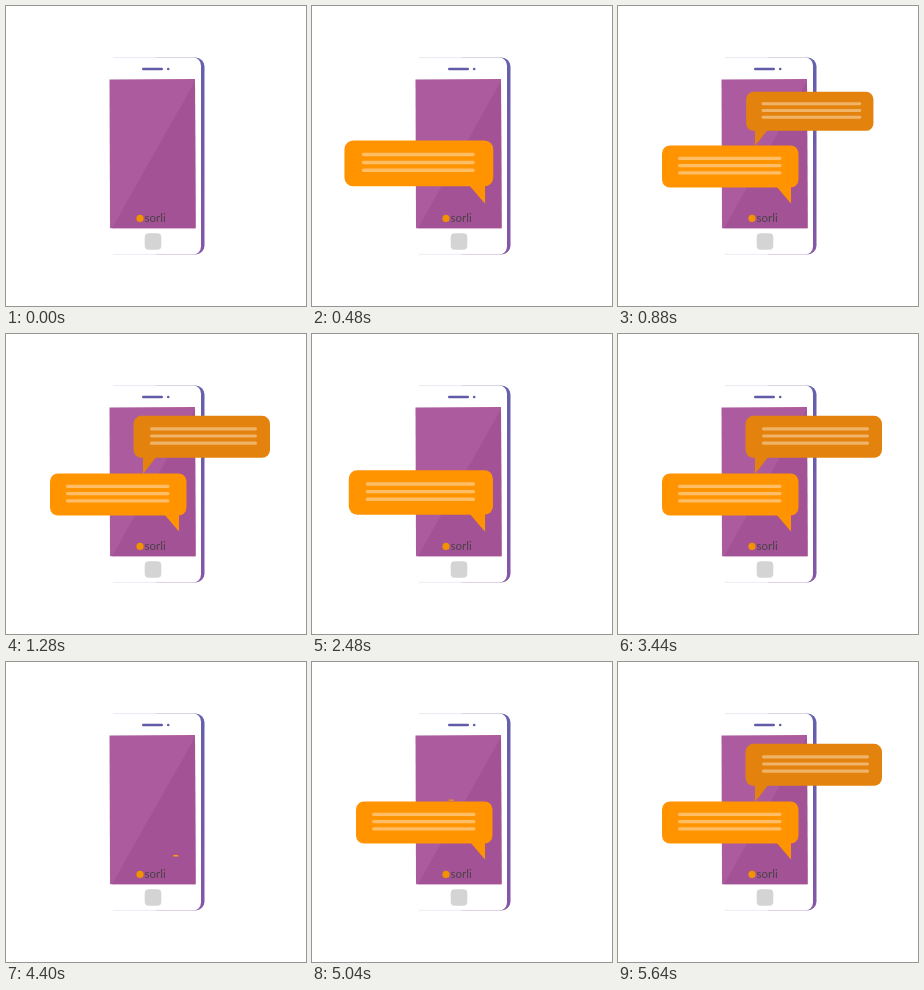
Recreate the animation shown at these times as an HTML page with a canvas. Size 300x300 px, loop 6 s.

```html
<!DOCTYPE html>
<html lang="en">
<head>
<meta charset="utf-8">
<title>Phone chat</title>
<style>
  html, body { margin: 0; width: 100%; height: 100%; overflow: hidden; background: #fff; }
  canvas { display: block; width: 300px; height: 300px; }
</style>
</head>
<body>
<canvas id="stage"></canvas>
<script>
const LOOP = 6000;
const TICK = 40;
const STEPS = 16;
const PEAK_STEP = 10.5;
const PEAK_SCALE = 1.1;
const REPLY_DELAY = 640;
const STARTS = [40, 2200, 4400];

const canvas = document.getElementById('stage');
const ctx = canvas.getContext('2d');
const dpr = window.devicePixelRatio || 1;
canvas.width = canvas.height = 300 * dpr;

const ASK = {
  x: 44, y: 139.5, w: 136.5, h: 42, fill: '#ff9300', line: '#ffbe66',
  tail: [[158, 180], [173, 197.5], [173, 180]],
  lines: [60, 163.5, 152.4], origin: [172, 195]
};
const REPLY = {
  x: 127.5, y: 81.8, w: 136.5, h: 42, fill: '#e3820d', line: '#f0b468',
  tail: [[137, 122], [137, 140], [151, 122]],
  lines: [144, 251, 94.8], origin: [137, 139.5]
};

function roundRect(x, y, w, h, r, fill) {
  ctx.beginPath();
  ctx.roundRect(x, y, w, h, r);
  ctx.fillStyle = fill;
  ctx.fill();
}

function polygon(points, fill) {
  ctx.beginPath();
  points.forEach(([x, y]) => ctx.lineTo(x, y));
  ctx.closePath();
  ctx.fillStyle = fill;
  ctx.fill();
}

function disc(x, y, r, fill) {
  ctx.beginPath();
  ctx.arc(x, y, r, 0, 2 * Math.PI);
  ctx.fillStyle = fill;
  ctx.fill();
}

function bar(x1, x2, y, width, color) {
  ctx.beginPath();
  ctx.moveTo(x1 + width / 2, y);
  ctx.lineTo(x2 - width / 2, y);
  ctx.lineWidth = width;
  ctx.lineCap = 'round';
  ctx.strokeStyle = color;
  ctx.stroke();
}

// cubic-bezier(.25, .1, .25, 1)
function ease(x) {
  let lo = 0, hi = 1;
  for (let i = 0; i < 24; i++) {
    const p = (lo + hi) / 2;
    if (0.75 * p * (1 - p) + p ** 3 < x) lo = p; else hi = p;
  }
  const q = 1 - lo;
  return 0.3 * lo * q * q + 3 * lo * lo * q + lo ** 3;
}

// Grows past full size, then settles back.
function popScale(elapsed) {
  if (elapsed < 0) return 0;
  const step = Math.min(STEPS, Math.floor(elapsed / TICK) + 1);
  if (step <= PEAK_STEP) return PEAK_SCALE * ease((step - 0.5) / (PEAK_STEP - 0.5));
  const back = (step - PEAK_STEP) / (STEPS - PEAK_STEP);
  return PEAK_SCALE - (PEAK_SCALE - 1) * back ** 1.8;
}

function drawPhone() {
  const side = ctx.createLinearGradient(0, 51, 0, 249);
  side.addColorStop(0, '#6360ae');
  side.addColorStop(0.4, '#6f5bab');
  side.addColorStop(1, '#8656a6');
  roundRect(150, 51.5, 48.5, 197, [0, 9, 9, 0], side);
  roundRect(102, 51.5, 93, 197, 8, '#fff');
  bar(107, 190, 51.6, 0.5, '#d9d6e8');
  bar(107, 190, 248.3, 0.5, '#dcd3e6');

  polygon([[103.5, 73.5], [189, 73], [189.6, 222.3], [104, 222.3]], '#ac5b9f');
  polygon([[189, 75], [189.6, 222.3], [106, 222.3]], '#a35395');

  bar(136, 157, 63, 2.4, '#5f5ba8');
  disc(162.2, 63, 1.3, '#5f5ba8');
  roundRect(138.7, 227.2, 16.6, 16.6, 4, '#d4d4d4');

  disc(134, 212.4, 3.6, '#f39200');
  ctx.font = '11.5px Lato, "Open Sans", sans-serif';
  ctx.fillStyle = '#4a4148';
  ctx.fillText('sorli', 138.5, 216);
}

function drawBubble(b, scale) {
  if (scale <= 0) return;
  const [ox, oy] = b.origin;
  const [x1, x2, y] = b.lines;
  ctx.save();
  ctx.translate(ox, oy);
  ctx.scale(scale, scale);
  ctx.translate(-ox, -oy);
  polygon(b.tail, b.fill);
  roundRect(b.x, b.y, b.w, b.h, 8, b.fill);
  for (let i = 0; i < 3; i++) bar(x1, x2, y + i * 7.2, 3.2, b.line);
  ctx.restore();
}

function draw(time) {
  ctx.setTransform(dpr, 0, 0, dpr, 0, 0);
  ctx.fillStyle = '#fff';
  ctx.fillRect(0, 0, 300, 300);
  drawPhone();
  const start = STARTS.filter(s => s <= time).pop();
  if (start === undefined) return;
  drawBubble(REPLY, popScale(time - start - REPLY_DELAY));
  drawBubble(ASK, popScale(time - start));
}

const begin = performance.now();
function frame() {
  draw((performance.now() - begin) % LOOP);
  requestAnimationFrame(frame);
}
frame();
</script>
</body>
</html>
```
